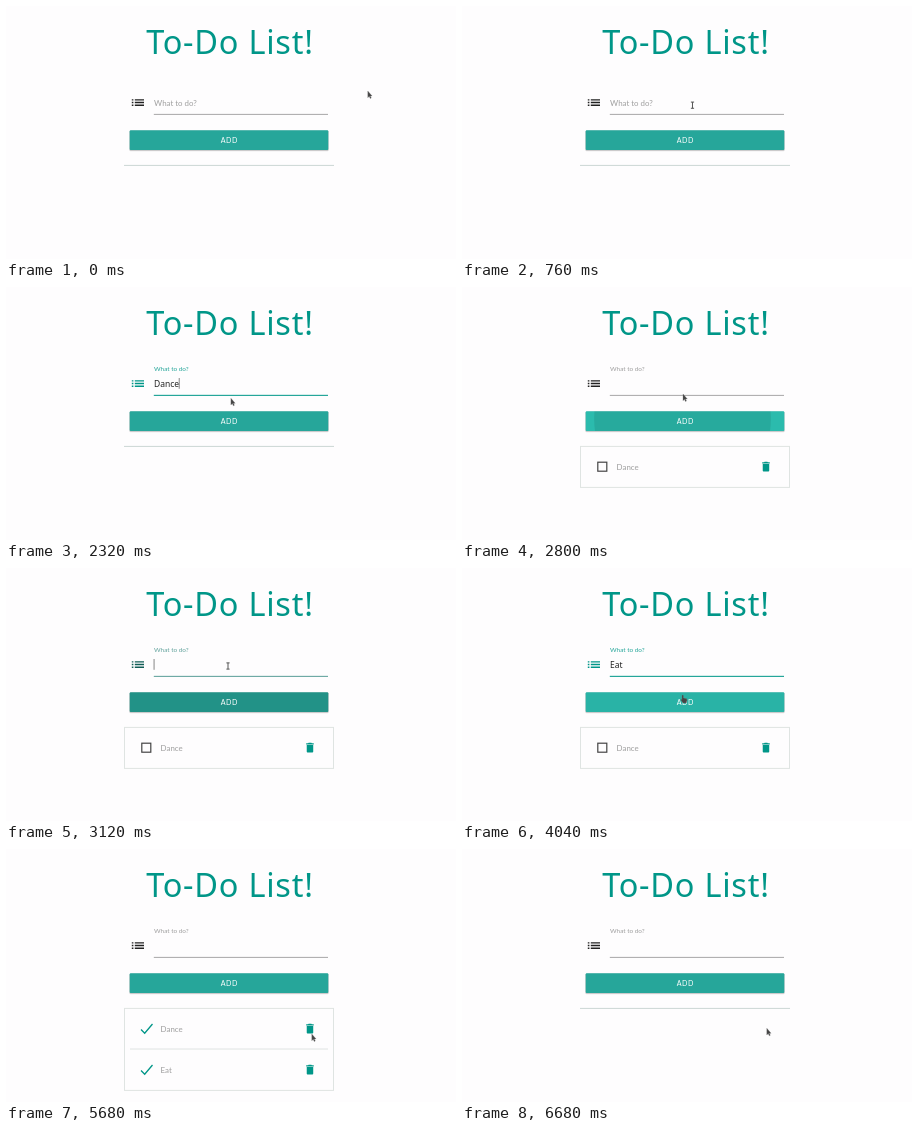
An HTML page for the animation above (7720 ms loop, 450 by 253 pixels).

```html
<!DOCTYPE html>
<html lang="en">
<head>
<meta charset="utf-8">
<title>To-Do List</title>
<style>
html, body { margin: 0; width: 100%; height: 100%; overflow: hidden; background: #fefdfe; }
svg { display: block; width: 450px; height: 253px; font-family: Lato, sans-serif; }
.title { font: 32.5px "Noto Sans", "Open Sans", sans-serif; letter-spacing: .75px; fill: #009688; }
.typed { font: 8.5px "Noto Sans", sans-serif; fill: #222; }
.add { font-size: 7.1px; letter-spacing: .5px; fill: #fff; }
.item { font-size: 7.9px; fill: #9e9e9e; }
</style>
</head>
<body>
<svg viewBox="0 0 450 253">
  <defs><clipPath id="btn"><rect x="123.7" y="124.2" width="198.6" height="19.8" rx="1"/></clipPath></defs>
  <text class="title" x="223.9" y="47.6" text-anchor="middle">To-Do List!</text>
  <g id="scene"></g>
</svg>
<script>
const LOOP = 7720;
const BASE = [38, 166, 154], HOVER = [43, 187, 173], DARK = [29, 125, 116];
const GREY = [158, 158, 158], BLACK = [34, 34, 34], TEAL = [0, 150, 136];

const scene = document.getElementById('scene');
const pen = document.createElement('canvas').getContext('2d');
pen.font = '8.5px "Noto Sans", sans-serif';

const clamp = v => Math.max(0, Math.min(1, v));
const smooth = v => v * v * (3 - 2 * v);
const mix = (a, b, p) => a.map((v, i) => v + (b[i] - v) * p);
const rgb = c => `rgb(${c.map(Math.round)})`;

// Each key is [time, ...values]; values ease from one key to the next.
function track(keys, t) {
  const i = keys.findIndex(k => k[0] > t);
  if (i < 0) return keys[keys.length - 1].slice(1);
  if (!i) return keys[0].slice(1);
  const a = keys[i - 1], b = keys[i];
  return mix(a.slice(1), b.slice(1), smooth((t - a[0]) / (b[0] - a[0])));
}

const mouse = [
  [360, 361.8, 85], [800, 227.5, 99.5], [2200, 227.5, 99.5], [2480, 221, 129],
  [2640, 221, 129], [2800, 221, 107], [2960, 222, 98], [3680, 222, 98],
  [4040, 220, 127], [4240, 220, 127], [4620, 138.5, 219.5], [4800, 138.5, 219.5],
  [5100, 139, 180], [5300, 139, 180], [5680, 305.8, 185], [5960, 304.8, 179.3]
];
const focus = [[960, 0], [1240, 1], [2520, 1], [2760, 0], [3000, 0], [3240, 1], [4120, 1], [4400, 0]];
const button = [
  [2340, ...BASE], [2480, ...HOVER], [2800, ...HOVER], [3000, ...DARK], [3240, ...BASE],
  [3880, ...BASE], [4160, ...HOVER], [4340, ...HOVER], [4600, ...DARK], [4720, ...DARK], [5000, ...BASE]
];
const clicks = [2520, 4120];
const typing = [
  { word: 'Dance', at: [1400, 1560, 1720, 1800, 1920], clear: 2520 },
  { word: 'Eat', at: [3240, 3360, 3520], clear: 4120 }
];
const items = [
  { name: 'Dance', added: 2560, done: 5160, gone: 6200 },
  { name: 'Eat', added: 4200, done: 4720, gone: 6560 }
];

function field(t) {
  const [f] = track(focus, t), lift = smooth(clamp((t - 960) / 240));
  const color = rgb(mix(GREY, BASE, f)), icon = rgb(mix(BLACK, TEAL, f));
  const bullets = [93.8, 96.5, 99.2].map(y =>
    `<path d="M125.8 ${y}h1.6M128.8 ${y}h9.2" stroke="${icon}" stroke-width="1.35"/>`).join('');
  const now = typing.find(w => t >= w.at[0] && t < w.clear);
  const text = now ? now.word.slice(0, now.at.filter(a => a <= t).length) : '';
  const active = (t >= 960 && t < 2520) || (t >= 3000 && t < 3960);
  const x = 147.7 + pen.measureText(text).width;
  return bullets +
    `<text x="148" y="${100 - 15.8 * lift}" font-size="${7.9 - 1.5 * lift}" fill="${color}">What to do?</text>
    <text class="typed" x="148" y="100">${text}</text>
    <rect x="147.8" y="${107.9 - .1 * f}" width="174.2" height="${.9 + .3 * f}" fill="${color}"/>` +
    (active ? `<rect x="${x}" y="91" width=".7" height="10.8" fill="#555"/>` : '');
}

function addButton(t) {
  const ripples = clicks.map(c => {
    const p = (t - c) / 520;
    if (p < 0 || p >= 1) return '';
    const r = 112 * (1 - (1 - p) ** 2);
    return `<circle cx="220.5" cy="132" r="${r}" opacity="${.2 * (1 - p)}"/>`;
  }).join('');
  return `<rect x="123.2" y="124.8" width="199.6" height="20.4" rx="1.5" opacity=".12"/>
    <rect x="123.7" y="124.8" width="198.6" height="19.8" rx="1" opacity=".18"/>
    <rect x="123.7" y="124.2" width="198.6" height="19.8" rx="1" fill="${rgb(track(button, t))}"/>
    <g clip-path="url(#btn)">${ripples}</g>
    <text class="add" x="223.3" y="137" text-anchor="middle">ADD</text>`;
}

function row(item, i, t) {
  const y = 179.7 + 41 * i, p = clamp((t - item.done) / 200);
  const size = 9 * (1 - clamp(p * 2)), tick = clamp(p * 2 - 1);
  const box = size ? `<rect x="${140.3 - size / 2}" y="${y - size / 2}" width="${size}" height="${size}" stroke="#444" stroke-width="1.2"/>` : '';
  const mark = tick ? `<path d="M135 ${y + .8}l3.7 3.7l7.8-9.2" stroke="#009688" stroke-width="1.3"
    pathLength="1" stroke-dasharray="${tick} 2"/>` : '';
  return `<g fill="none">${box}${mark}</g>
    <text class="item" x="154.6" y="${y + 3}">${item.name}</text>
    <path transform="translate(297.5 ${y - 6.5}) scale(.54)" fill="#009688"
      d="M6 19c0 1.1.9 2 2 2h8c1.1 0 2-.9 2-2V7H6zM19 4h-3.5l-1-1h-5l-1 1H5v2h14z"/>` +
    (i ? '<path d="M124 200h198" stroke="#dfe3e2"/>' : '');
}

function list(t) {
  const shown = items.filter(i => t >= i.added && t < i.gone);
  if (!shown.length) return '<path d="M118 159.4h210" stroke="#cbd6d4"/>';
  return `<rect x="118.5" y="159.4" width="209" height="${41 * shown.length}" fill="none" stroke="#dfe4e2"/>` +
    shown.map((item, i) => row(item, i, t)).join('');
}

function pointer(t) {
  const [x, y] = track(mouse, t);
  const overField = x > 148 && x < 322 && y > 88 && y < 106;
  const overLink = (y > 124 && y < 144) || (x < 148 && y > 172) || (t > 5800 && t < 6680);
  const beam = 'M-1.6-3.1H1.6M0-3.1V3.1M-1.6 3.1H1.6';
  const hand = 'M0 .5Q.7-.5 1.4.5V3L4.8 3.8L5 5.5L4.2 8H1L-1.3 4.8L-.6 4.2L0 4.8z';
  const arrow = 'M0 0V6.7L1.4 5.3L2.4 7.5L3.5 7L2.5 5H4.3z';
  const shape = overField
    ? `<path d="${beam}" fill="none" stroke="#555" stroke-width="1"/>`
    : `<path d="${overLink ? hand : arrow}" fill="#444" stroke="#777" stroke-width=".3"/>`;
  return `<g transform="translate(${x} ${y})">${shape}</g>`;
}

function draw() {
  const t = performance.now() % LOOP;
  scene.innerHTML = field(t) + addButton(t) + list(t) + pointer(t);
  requestAnimationFrame(draw);
}
draw();
</script>
</body>
</html>
```
